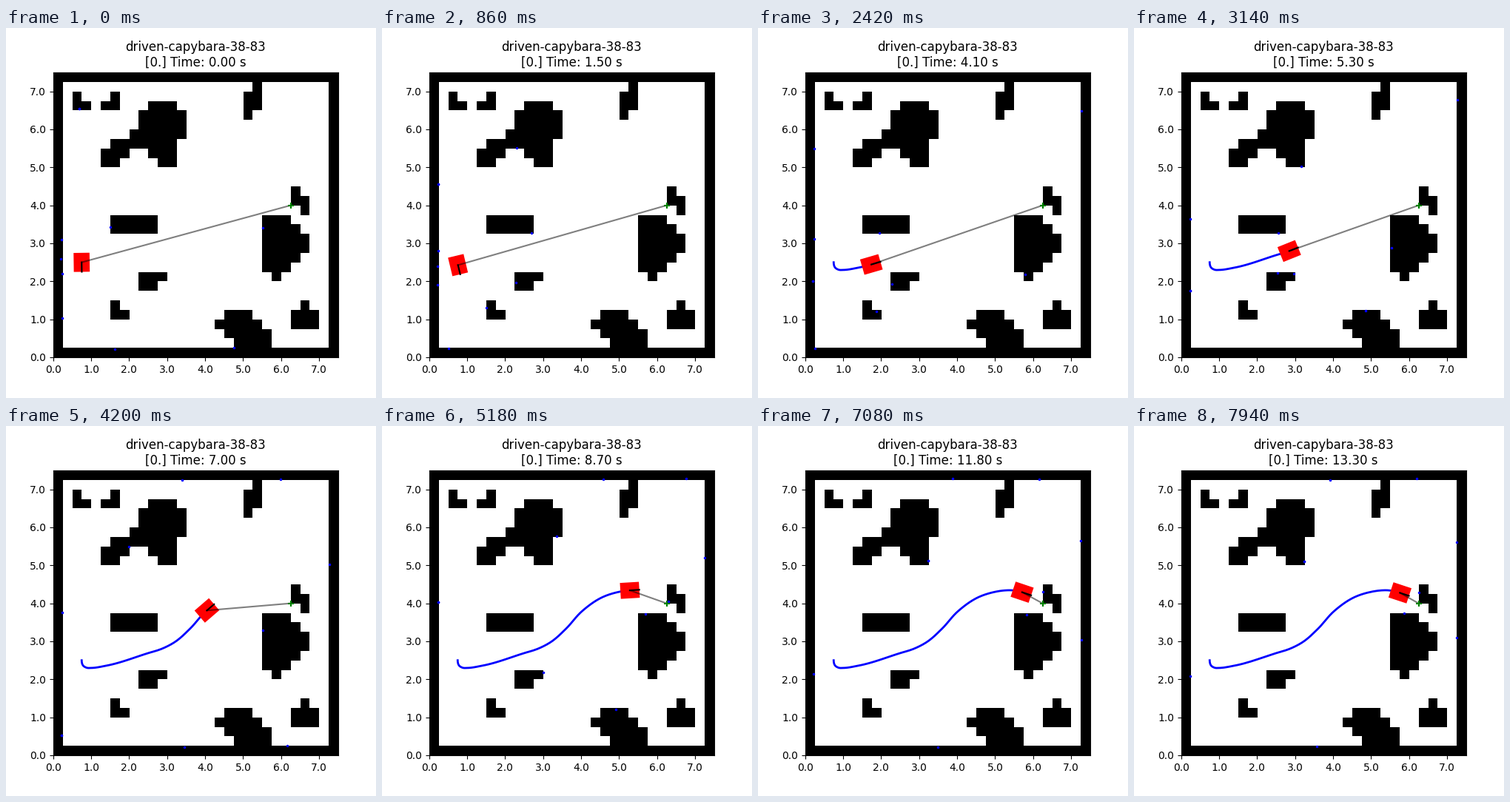
Write a matplotlib script that moves like this. It is 500 px wide and 500 px high and loops after 8000 ms.

```python
import numpy as np
import matplotlib.pyplot as plt
from matplotlib.animation import FuncAnimation
from matplotlib.patches import Polygon

CELL = 0.25
SIZE = 30
GOAL = (6.25, 4.0)
STEP_S = 0.1
TICK_MS = 20
TICKS = 400
STEPS = 134

# bricks by (width, height), each placed by its lower left cell
BRICKS = {
    (1, 2): [(2, 26), (6, 26), (25, 16), (26, 15), (6, 4), (26, 11),
             (27, 3), (23, 8), (25, 10), (25, 12)],
    (2, 1): [(2, 26), (5, 26), (6, 4), (10, 8), (17, 3), (20, 3)],
    (1, 3): [(21, 26), (20, 25), (26, 3)],
    (2, 2): [(5, 20), (6, 21), (9, 7), (11, 20), (25, 3), (19, 1), (21, 1)],
    (5, 2): [(6, 13), (8, 22)],
    (3, 3): [(18, 2), (9, 23), (11, 23)],
    (3, 6): [(10, 21), (22, 9)],
}

# the road, and the speed along it at a few times
WAYPOINTS = np.array([
    (0.75, 2.5), (0.79, 2.36), (0.89, 2.303), (1.0, 2.3), (1.4, 2.36),
    (2.5, 2.69), (2.85, 2.8), (3.2, 2.98), (3.6, 3.33), (4.02, 3.79),
    (4.6, 4.18), (4.95, 4.292), (5.25, 4.34), (5.45, 4.343),
    (5.675, 4.305), (5.76, 4.277),
])
SPEED_T = (0, 2, 3, 4, 7.9, 9.2, 10, 13.3)
SPEED = (0, 0.13, 0.35, 0.98, 0.9, 0.22, 0.09, 0.035)


def make_grid():
    grid = np.ones((SIZE, SIZE), dtype=int)
    grid[1:-1, 1:-1] = 0
    for (w, h), cells in BRICKS.items():
        for c, r in cells:
            grid[r:r + h, c:c + w] = 1
    return grid


def path_length(points):
    gaps = np.hypot(*np.diff(points, axis=0).T)
    return np.concatenate([[0], np.cumsum(gaps)])


def smooth_path(points, samples=2000):
    """Cubic Hermite curve through the points, starting straight down."""
    knots = path_length(points)
    slopes = np.gradient(points, knots, axis=0)
    slopes[0] = 0.01, -1
    q = np.linspace(0, knots[-1], samples)
    i = np.clip(np.searchsorted(knots, q, side="right") - 1, 0, len(knots) - 2)
    d = (knots[i + 1] - knots[i])[:, None]
    u = (q - knots[i])[:, None] / d
    return ((1 + 2 * u) * (1 - u) ** 2 * points[i]
            + u * (1 - u) ** 2 * d * slopes[i]
            + u ** 2 * (3 - 2 * u) * points[i + 1]
            + u ** 2 * (u - 1) * d * slopes[i + 1])


def make_poses():
    road = smooth_path(WAYPOINTS)
    along = path_length(road)
    dx, dy = np.gradient(road, axis=0).T
    heading = np.unwrap(np.arctan2(dy, dx))
    fine = np.linspace(0, SPEED_T[-1], 1331)
    v = np.interp(fine, SPEED_T, SPEED)
    travel = np.concatenate([[0], np.cumsum((v[1:] + v[:-1]) / 2)]) * fine[1]
    s = np.interp(np.arange(STEPS) * STEP_S, fine, travel)
    return np.column_stack([np.interp(s, along, f)
                            for f in (road[:, 0], road[:, 1], heading)])


GRID = make_grid()
POSES = make_poses()
BEAMS = np.linspace(-np.pi, np.pi, 10)
RANGES = np.arange(1, 220) * 0.05
CAR = np.array([(-0.25, -0.21), (0.25, -0.21), (0.25, 0.21), (-0.25, 0.21)])


def scan(x, y, heading):
    """March every beam until it enters an occupied cell."""
    a = heading + BEAMS[:, None]
    px = x + RANGES * np.cos(a)
    py = y + RANGES * np.sin(a)
    col = np.clip((px / CELL).astype(int), 0, SIZE - 1)
    row = np.clip((py / CELL).astype(int), 0, SIZE - 1)
    hit = GRID[row, col].argmax(axis=1)
    beam = np.arange(len(BEAMS))
    return px[beam, hit], py[beam, hit]


fig, ax = plt.subplots(figsize=(5, 5), dpi=100)
side = SIZE * CELL
ax.imshow(GRID, cmap="binary", origin="lower", extent=(0, side, 0, side),
          interpolation="nearest")
ax.set_xlim(0, side)
ax.set_ylim(0, side)
ax.set_xticks(range(8))
ax.set_yticks(range(8))
ax.xaxis.set_major_formatter("{x:.1f}")
ax.yaxis.set_major_formatter("{x:.1f}")
title = ax.set_title("")

trail, = ax.plot([], [], "b-", lw=2, zorder=2)
car = Polygon(CAR, closed=True, fc="red", ec="none", zorder=3)
ax.add_patch(car)
sight, = ax.plot([], [], "k-", lw=1.5, alpha=0.5, zorder=4)
nose, = ax.plot([], [], "k-", lw=1.5, zorder=5)
ax.plot(*GOAL, "g+", mew=1.5, zorder=5)
dots, = ax.plot([], [], "bo", ms=1.5, mew=1, zorder=6)


def step_at(tick):
    # steps alternate between one tick and five ticks on screen
    return 2 * (tick // 6) + (tick % 6 > 0)


def update(tick):
    k = step_at(tick)
    x, y, h = POSES[k]
    c, s = np.cos(h), np.sin(h)
    title.set_text(f"driven-capybara-38-83\n[0.] Time: {k * STEP_S:.2f} s")
    trail.set_data(POSES[:k + 1, 0], POSES[:k + 1, 1])
    car.set_xy(CAR @ np.array([[c, s], [-s, c]]) + (x, y))
    sight.set_data([x, GOAL[0]], [y, GOAL[1]])
    nose.set_data([x, x + 0.25 * c], [y, y + 0.25 * s])
    dots.set_data(*scan(x, y, h))
    return title, trail, car, sight, nose, dots


anim = FuncAnimation(fig, update, frames=TICKS, interval=TICK_MS,
                     init_func=lambda: update(0), repeat=True, repeat_delay=0)
plt.show()
```
